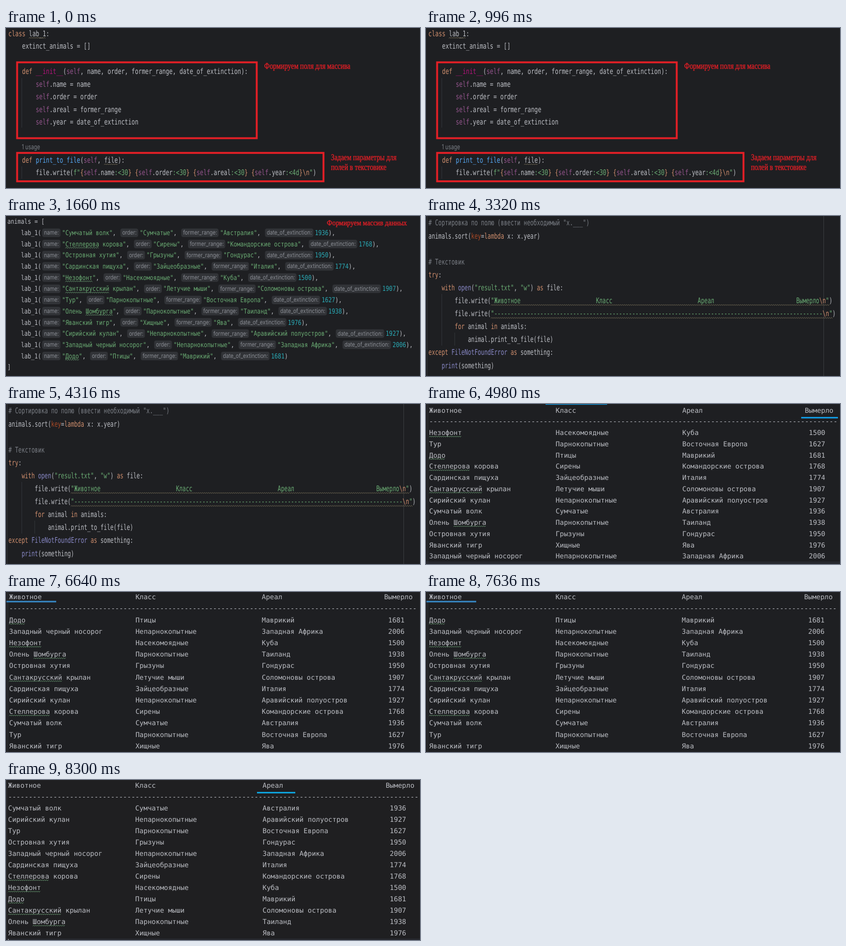
Recreate the animation shown at these times as an HTML page. Size 800x310 px, loop 9960 ms.

```html
<!DOCTYPE html>
<html lang="ru">
<head>
<meta charset="utf-8">
<title>Вымершие животные</title>
<style>
  html, body { margin: 0; width: 100%; height: 100%; overflow: hidden; background: #1e1f22; }
  svg { display: block; width: 800px; height: 310px; }
  text { white-space: pre; fill: #bcbec4; text-rendering: geometricPrecision; }
  .mono { font-family: "DejaVu Sans Mono", monospace; }
  .ui { font-family: Inter, sans-serif; }
  .note { font-family: "Liberation Serif", serif; fill: #e21f26; stroke: #e21f26; stroke-width: 0.4; }
  .k { fill: #cf8e6d; }  /* keyword, escape */
  .s { fill: #6aab73; }  /* string */
  .n { fill: #2aacb8; }  /* number */
  .c { fill: #7a7e85; }  /* comment */
  .h { fill: #8a8d94; }  /* inlay hint */
  .v { fill: #94558d; }  /* self */
  .d { fill: #b0147a; }  /* dunder */
  .f { fill: #56a8f5; }  /* function name */
  .b { fill: #8888c6; }  /* builtin */
  .a { fill: #aa4926; }  /* named argument */
</style>
</head>
<body>
<svg viewBox="0 0 800 310"></svg>
<script>
const HOLD = 1660;
const ADVANCE = 0.602; // monospace advance per em
const RED = '#e21f26', GUIDE = '#313438', WEAK = '#756d56', TYPO = '#6a9c73';
const TYPOS = /Стеллерова|Незофонт|Сантакрусский|Шомбурга|Додо/;

const animals = [
  ['Сумчатый волк', 'Сумчатые', 'Австралия', 1936],
  ['Стеллерова корова', 'Сирены', 'Командорские острова', 1768],
  ['Островная хутия', 'Грызуны', 'Гондурас', 1950],
  ['Сардинская пищуха', 'Зайцеобразные', 'Италия', 1774],
  ['Незофонт', 'Насекомоядные', 'Куба', 1500],
  ['Сантакрусский крылан', 'Летучие мыши', 'Соломоновы острова', 1907],
  ['Тур', 'Парнокопытные', 'Восточная Европа', 1627],
  ['Олень Шомбурга', 'Парнокопытные', 'Таиланд', 1938],
  ['Яванский тигр', 'Хищные', 'Ява', 1976],
  ['Сирийский кулан', 'Непарнокопытные', 'Аравийский полуостров', 1927],
  ['Западный черный носорог', 'Непарнокопытные', 'Западная Африка', 2006],
  ['Додо', 'Птицы', 'Маврикий', 1681],
];
const columns = (a, b, c, d, last = 31) =>
  a.padEnd(31) + b.padEnd(31) + c.padEnd(last) + d;
const HEADER = columns('Животное', 'Класс', 'Ареал', 'Вымерло', 30);
const DASHES = '-'.repeat(100);

const svg = document.querySelector('svg');

function add(parent, tag, attrs, text) {
  const el = document.createElementNS('http://www.w3.org/2000/svg', tag);
  for (const name in attrs) el.setAttribute(name, attrs[name]);
  if (text !== undefined) el.textContent = text;
  return parent.appendChild(el);
}

// A page holds text on a character grid: first column x, first row centre y.
class Page {
  constructor(x, y, pitch, step, size, bg = '#1e1f22') {
    Object.assign(this, { x, y, pitch, step, size });
    this.squeeze = pitch / (size * ADVANCE);
    this.g = add(svg, 'g', {});
    this.rect(0, 0, 800, 310, bg);
  }
  colX(col) { return this.x + col * this.pitch; }
  rowY(row) { return this.y + row * this.step; }

  rect(x, y, width, height, fill, rx = 0) {
    add(this.g, 'rect', { x, y, width, height, fill, rx });
  }
  frame(x, y, width, height) {
    add(this.g, 'rect', { x, y, width, height, fill: 'none', stroke: RED, 'stroke-width': 3.7 });
  }
  label(x, baseline, text, cls, size, squeeze) {
    return add(this.g, 'text', {
      class: cls, 'font-size': size,
      transform: `translate(${x} ${baseline}) scale(${squeeze} 1)`,
    }, text);
  }
  // Coloured runs are written as ~k:text~.
  write(x, y, source) {
    const el = this.label(x, y + this.size * 0.36, '', 'mono', this.size, this.squeeze);
    let length = 0;
    source.split('~').forEach((part, i) => {
      const text = i % 2 ? part.slice(2) : part;
      add(el, 'tspan', i % 2 ? { class: part[0] } : {}, text);
      length += text.length;
    });
    return x + length * this.pitch;
  }
  line(row, source) { this.write(this.x, this.rowY(row), source); }

  wave(x, y, width, stroke) {
    let d = `M${x} ${y + this.step * 0.35 + 1}`;
    for (let i = 1; i * 2 <= width; i++) d += `l2 ${i % 2 ? -2 : 2}`;
    add(this.g, 'path', { d, fill: 'none', stroke, 'stroke-width': 1 });
  }
  markTypo(x, y, text) {
    const hit = TYPOS.exec(text);
    if (hit) this.wave(x + hit.index * this.pitch, y, hit[0].length * this.pitch, TYPO);
  }
}

function classPage() {
  const p = new Page(4.6, 10.5, 6.61, 24.5, 15);
  p.rect(30, 97, 1, 96, GUIDE);
  p.rect(30, 268, 1, 24, GUIDE);
  const field = (name, spec) => `~k:{~~v:self~.${name}~s::<${spec}~~k:}~`;
  [
    '~k:class~ lab_1:',
    '    extinct_animals = []',
    '',
    '    ~k:def~ ~d:__init__~(~v:self~, name, order, former_range, date_of_extinction):',
    '        ~v:self~.name = name',
    '        ~v:self~.order = order',
    '        ~v:self~.areal = former_range',
    '        ~v:self~.year = date_of_extinction',
    '', '',
    '    ~k:def~ ~f:print_to_file~(~v:self~, file):',
    `        file.write(~s:f"~${field('name', '30')} ${field('order', '30')} ` +
      `${field('areal', '30')} ${field('year', '4d')}~k:\\n~~s:"~)`,
  ].forEach((source, row) => p.line(row, source));
  p.wave(p.colX(6), p.rowY(0), 5 * p.pitch, WEAK);
  p.wave(p.colX(28), p.rowY(10), 4 * p.pitch, WEAK);
  p.label(30.5, 235.3, '1 usage', 'ui c', 13.4, 0.74);
  p.frame(21.5, 66.5, 463, 147);
  p.frame(21.5, 242, 592, 55);
  p.label(499, 79, 'Формируем поля для массива', 'note', 17, 0.778);
  p.label(628, 256, 'Задаем параметры для', 'note', 17, 0.778);
  p.label(628, 275, 'полей в текстовике', 'note', 17, 0.778);
  return p;
}

function arrayPage() {
  const p = new Page(2.8, 10.5, 6.52, 21.7, 13.2);
  const hints = [['name:', 40.3], ['order:', 39.3], ['former_range:', 77], ['date_of_extinction:', 98.5]];
  p.line(0, 'animals = [');
  animals.forEach((animal, i) => {
    const y = p.rowY(i + 1);
    let x = p.write(p.colX(4), y, 'lab_1(');
    animal.forEach((value, k) => {
      const [hint, width] = hints[k];
      p.rect(x + 2, y - 8, width - 5, 16.5, '#313337', 4);
      p.label(x + 5.5, y + 4, hint, 'ui h', 12, 0.82);
      x += width;
      if (k === 0) p.markTypo(x + p.pitch, y, value);
      const end = i < animals.length - 1 ? '),' : ')';
      x = p.write(x, y, k < 3 ? `~s:"${value}"~, ` : `~n:${value}~${end}`);
    });
  });
  p.line(13, ']');
  p.label(620, 17.8, 'Формируем массив данных', 'note', 15, 0.885);
  return p;
}

function sortPage() {
  const p = new Page(4.8, 13, 6.35, 25.1, 15.2);
  p.rect(2, 0, 1, 310, GUIDE);
  p.rect(768, 0, 1, 310, '#393b40');
  p.rect(30, 151, 1, 100, GUIDE);
  p.rect(55, 226, 1, 25, GUIDE);
  const write = text => `        file.write(~s:"${text}~~k:\\n~~s:"~)`;
  [
    '~c:# Сортировка по полю (ввести необходимый "x.___")~',
    'animals.sort(~a:key~=~k:lambda~ x: x.year)',
    '',
    '~c:# Текстовик~',
    '~k:try~:',
    '    ~k:with~ ~b:open~(~s:"result.txt"~, ~s:"w"~) ~k:as~ file:',
    write(HEADER),
    write(DASHES),
    '        ~k:for~ animal ~k:in~ animals:',
    '            animal.print_to_file(file)',
    '~k:except~ ~b:FileNotFoundError~ ~k:as~ something:',
    '    ~b:print~(something)',
  ].forEach((source, row) => p.line(row, source));
  p.wave(p.colX(19), p.rowY(6), 103 * p.pitch, WEAK);
  p.wave(p.colX(19), p.rowY(7), 104 * p.pitch, WEAK);
  return p;
}

function tablePage(p, key, dashY, firstY) {
  p.rect(p.x - 3, 0, 1, 310, GUIDE);
  p.line(0, HEADER);
  p.write(p.x, dashY, DASHES);
  [...animals].sort((a, b) => (a[key] < b[key] ? -1 : 1)).forEach((animal, i) => {
    const y = firstY + i * p.step;
    p.write(p.x, y, columns(...animal));
    p.markTypo(p.x, y, animal[0]);
  });
  return p;
}

const byYear = new Page(6, 12.5, 7.894, 21.73, 13.1);
byYear.rect(0, 305, 800, 5, '#26282e');
tablePage(byYear, 3, 33.5, 55.5);
byYear.rect(231, 0, 119, 1.3, '#1296db');
byYear.rect(725, 25, 71, 3, '#1296db');

const byName = tablePage(new Page(6, 9.5, 7.88, 22.18, 13.1), 0, 31.5, 54);
byName.rect(1, 17, 96, 3.2, '#3580b9');

const byArea = new Page(4, 10.5, 7.935, 22, 13.18, '#1f1f21');
byArea.rect(1, 307, 799, 3, '#26282e');
tablePage(byArea, 2, 32.5, 54.5);
byArea.rect(485, 23, 74, 3, '#0ea0d8');
byArea.rect(4, 308, 1, 2, '#ced0d6');

const pages = [classPage(), arrayPage(), sortPage(), byYear, byName, byArea];
const total = HOLD * pages.length;
const shown = 1 / pages.length;
pages.forEach(({ g }, i) => g.animate([
  { visibility: 'visible', offset: 0 },
  { visibility: 'visible', offset: shown },
  { visibility: 'hidden', offset: shown },
  { visibility: 'hidden', offset: 1 },
], { duration: total, delay: i * HOLD - total, iterations: Infinity }));
</script>
</body>
</html>
```
